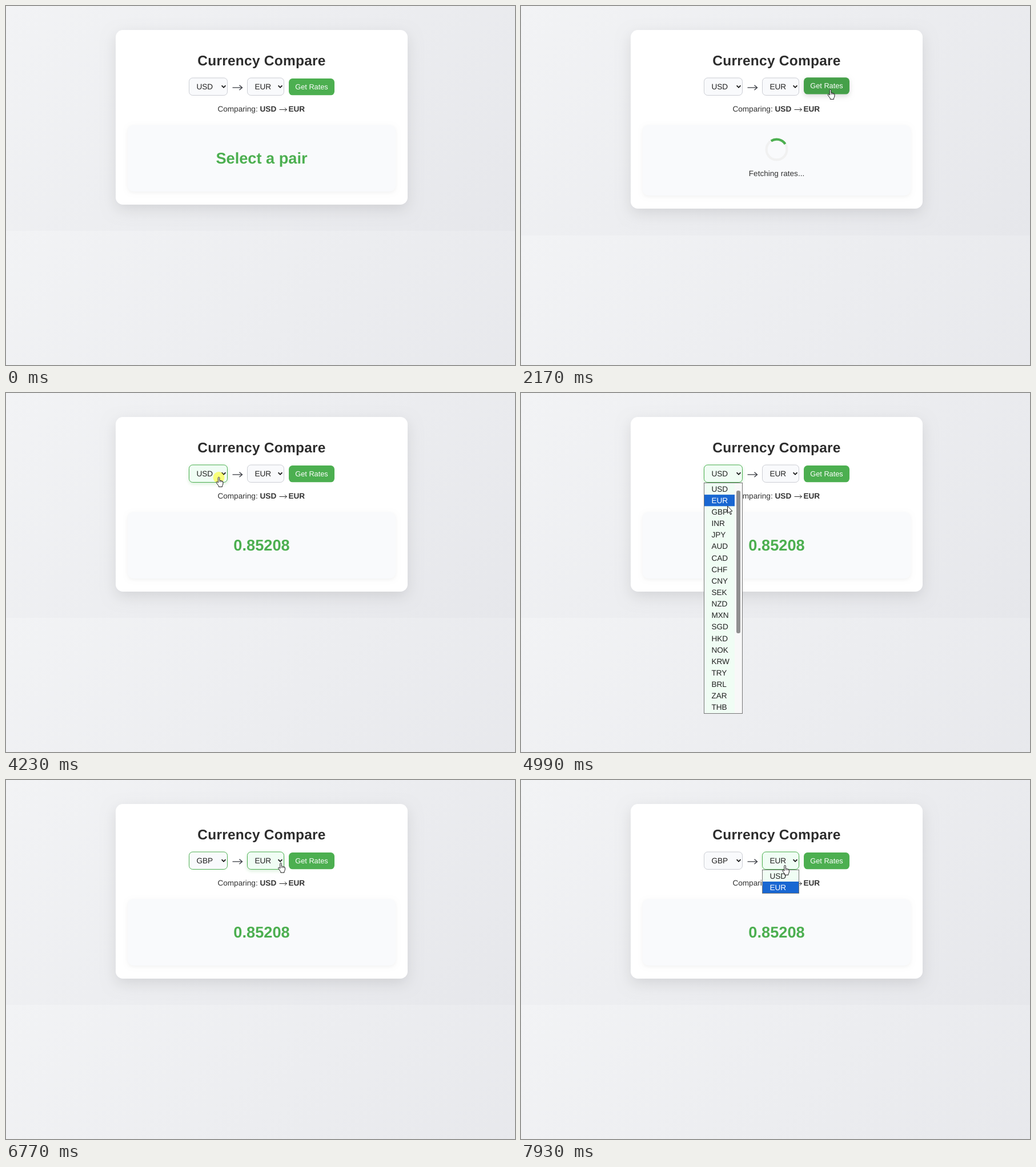
An HTML page with a canvas that plays this animation: 891x629 px, repeating every 8 s.

```html
<!DOCTYPE html>
<html lang="en">
<head>
<meta charset="utf-8">
<title>Currency Compare</title>
<style>
html, body { margin: 0; width: 100%; height: 100%; overflow: hidden; background: #ebecf0; }
canvas { display: block; }
</style>
</head>
<body>
<canvas id="stage" width="891" height="629"></canvas>
<script>
const W = 891, H = 629, LOOP = 8000;
const ctx = document.getElementById('stage').getContext('2d');
const FONT = '"Liberation Sans", Arial, sans-serif';
const GREEN = '#4caf50', INK = '#333';
const CODES = ('USD EUR GBP INR JPY AUD CAD CHF CNY SEK ' +
  'NZD MXN SGD HKD NOK KRW TRY BRL ZAR THB').split(' ');

// Cursor hot spot: time, x, y
const PATH = [
  [280, 855, 452], [1000, 543, 149], [1100, 545, 145], [1570, 545, 145],
  [1640, 541.5, 146], [2430, 541.5, 146], [2870, 521, 212], [3349, 521, 212],
  [3350, 518, 212], [3550, 518, 212], [4230, 372.5, 147], [4330, 372.5, 147],
  [5130, 360, 202], [5199, 360, 202], [5200, 360, 201], [5490, 360, 201],
  [5880, 455, 192], [6200, 455, 192], [6520, 462, 146], [6620, 462, 146],
  [6980, 512, 143], [7120, 510, 143], [7330, 460, 140], [7700, 462, 149]
];
const LOAD = [2137, 2520];
const CLICKS = [[2100, 2165], [4230, 4370], [5460, 5525], [7720, 7860]];
const LIST_A = [4300, 5525], LIST_B = [7790, 8000];

const within = (t, [a, b]) => t >= a && t < b;
const clamp = v => Math.max(0, Math.min(1, v));
const smooth = v => { v = clamp(v); return v * v * (3 - 2 * v); };
const fade = (t, on, off, dur = 250) => smooth((t - on) / dur) - smooth((t - off) / dur);
const mix = (a, b, k) => `rgb(${a.map((v, i) => Math.round(v + (b[i] - v) * k))})`;

function cursorAt(t) {
  const i = PATH.findIndex(p => p[0] > t);
  if (i < 0) return PATH[PATH.length - 1].slice(1);
  const [t0, x0, y0] = PATH[i - 1], [t1, x1, y1] = PATH[i];
  const k = smooth((t - t0) / (t1 - t0));
  return [x0 + (x1 - x0) * k, y0 + (y1 - y0) * k];
}

function box(x, y, w, h, r, fill, shadow) {
  ctx.save();
  if (shadow) [ctx.shadowOffsetY, ctx.shadowBlur, ctx.shadowColor] = shadow;
  ctx.fillStyle = fill;
  ctx.beginPath();
  ctx.roundRect(x, y, w, h, r);
  ctx.fill();
  ctx.restore();
}

function text(str, x, y, size, color, { bold = false, align = 'left', spacing = 0 } = {}) {
  ctx.font = `${bold ? 'bold ' : ''}${size}px ${FONT}`;
  ctx.textRendering = 'geometricPrecision';
  ctx.letterSpacing = spacing + 'px';
  ctx.textAlign = align;
  ctx.fillStyle = color;
  ctx.fillText(str, x, y);
}

function line(points, color, width) {
  ctx.strokeStyle = color;
  ctx.lineWidth = width;
  ctx.beginPath();
  points.forEach(([x, y]) => ctx.lineTo(x, y));
  ctx.stroke();
}

function arrow(x0, x1, y, head, color, width) {
  line([[x0, y], [x1, y]], color, width);
  line([[x1 - head, y - head * 0.85], [x1, y], [x1 - head, y + head * 0.85]], color, width);
}

function background(h) {
  const q = (W + h) / 4;
  for (let y = 0; y < H; y += h) {
    const g = ctx.createLinearGradient(W / 2 - q, y + h / 2 - q, W / 2 + q, y + h / 2 + q);
    g.addColorStop(0, '#f2f3f5');
    g.addColorStop(1, '#e6e7eb');
    ctx.fillStyle = g;
    ctx.fillRect(0, y, W, h);
  }
}

const selectFill = k => mix([249, 250, 252], [240, 253, 244], k);

function select(x, w, label, hover, focus) {
  const fill = selectFill(hover);
  box(x, 125.5, w, 31.5, 6.8, fill, [2, 6, `rgba(76,175,80,${0.25 * hover})`]);
  ctx.strokeStyle = mix([204, 206, 212], [76, 175, 80], Math.max(hover, focus));
  ctx.lineWidth = 1;
  ctx.beginPath();
  ctx.roundRect(x + 0.5, 126, w - 1, 30.5, 6.3);
  ctx.stroke();
  text(label, x + 13.4, 146, 13.6, '#222');
  const c = x + w - 7;
  line([[c - 3.4, 139.4], [c, 142.9], [c + 3.4, 139.4]], '#111', 1.7);
}

function list(x, w, codes, active, bottom, fill, scroll) {
  const top = 157, row = (bottom - top - 2) / codes.length, bar = scroll ? 13 : 0;
  ctx.fillStyle = fill;
  ctx.fillRect(x, top, w, bottom - top);
  codes.forEach((code, i) => {
    const y = top + 1 + i * row;
    if (i === active) {
      ctx.fillStyle = '#1967d2';
      ctx.fillRect(x + 1, y, w - 2 - bar, row);
    }
    text(code, x + 13.4, y + 14.6, 13.6, i === active ? '#fff' : '#222');
  });
  if (scroll) {
    ctx.fillStyle = '#f8f8f8';
    ctx.fillRect(x + w - 1 - bar, top + 1, bar, bottom - top - 2);
    box(x + w - bar + 2, top + 14, bar - 6, 250, 3, '#909090');
  }
  ctx.strokeStyle = '#767676';
  ctx.lineWidth = 1;
  ctx.strokeRect(x + 0.5, top + 0.5, w - 1, bottom - top - 1);
}

function button(hover) {
  const y = 127 - 1.7 * hover;
  box(495, y, 80, 29.3, 6.5, mix([76, 175, 80], [69, 160, 73], hover),
    [3.4, 8.5, `rgba(0,0,0,${0.14 * hover})`]);
  text('Get Rates', 535, y + 18.7, 12.75, '#fff', { align: 'center' });
}

function spinner(t) {
  const start = (t - LOAD[0]) / 1000 * Math.PI * 2 - Math.PI * 0.75;
  const ring = (from, sweep, color) => {
    ctx.strokeStyle = color;
    ctx.lineWidth = 4.25;
    ctx.beginPath();
    ctx.arc(447.5, 251.5, 17.9, from, from + sweep);
    ctx.stroke();
  };
  ring(0, Math.PI * 2, '#f1f1f1');
  ring(start, Math.PI / 2, GREEN);
  text('Fetching rates...', 447.5, 298, 13.6, INK, { align: 'center' });
}

const POINTER = new Path2D('M.5 .5V13.2L3.4 10.5L5.6 15.3L7.4 14.5L5.3 9.8L9 9.4Z');
const HAND = new Path2D('M-1.2 10.2V1.6Q-1.1.4 0 .4T1.3 1.6V6.3Q2.6 5.6 3.5 6.9Q4.9 6.2 5.6 7.5' +
  'Q7.2 7.1 7.4 8.8V12Q7.2 14 6 15.4V17.4H-.2V15.8L-3.7 11Q-5 8.8-3.8 8.4Q-2.9 8-1.2 10.2Z');

function cursor(t) {
  const [x, y] = cursorAt(t);
  if (CLICKS.some(c => within(t, c))) {
    ctx.fillStyle = 'rgba(255,255,0,.5)';
    ctx.beginPath();
    ctx.arc(x, y + 1, 10, 0, Math.PI * 2);
    ctx.fill();
  }
  const overControl = y > 125 && y < 157 &&
    [[320, 388], [422, 487], [495, 575]].some(s => within(x, s));
  const shape = overControl ? HAND : POINTER;
  ctx.save();
  ctx.translate(x, y);
  ctx.lineJoin = 'round';
  ctx.lineWidth = 1;
  ctx.fillStyle = '#fff';
  ctx.strokeStyle = '#1c1c1c';
  ctx.fill(shape);
  ctx.stroke(shape);
  if (overControl) [1.3, 3.4, 5.5].forEach(k => line([[k, 6.8], [k, 9.3]], '#1c1c1c', 0.8));
  ctx.restore();
}

function draw(t) {
  const loading = within(t, LOAD), grow = loading ? 7 : 0;
  const hoverA = fade(t, 4020, 5525, 200);
  const hoverB = fade(t, 6440, 6780) + fade(t, 7225, 9000);
  const hoverBtn = fade(t, 920, 2550) + fade(t, 6760, 7205);

  background(394 + grow + (loading ? 1 : 0));
  box(192, 42, 511, 306 + grow, 12.5, '#fff', [8.5, 25, 'rgba(0,0,0,.1)']);
  text('Currency Compare', 447.5, 104, 24.48, '#2d2d2d', { bold: true, align: 'center', spacing: 0.25 });

  select(320, 68, t < 5525 ? 'USD' : 'GBP', hoverA, fade(t, 4180, 7700, 200));
  arrow(396.5, 413.5, 143, 5, '#2c2f36', 1.2);
  select(422, 65, 'EUR', hoverB, fade(t, 7700, 9000, 150));
  button(hoverBtn);

  text('Comparing:', 370.4, 185.3, 13.6, INK);
  text('USD', 444.5, 185.3, 13.6, INK, { bold: true });
  arrow(478.5, 491.5, 181.5, 3.6, INK, 1);
  text('EUR', 494.4, 185.3, 13.6, INK, { bold: true });

  box(213, 208.5, 469, 116.5 + grow, 10, '#f9fafc', [2, 7, 'rgba(0,0,0,.05)']);
  if (loading) spinner(t);
  else text(t < LOAD[0] ? 'Select a pair' : '0.85208', 447.5, 276, 27.2, GREEN, { bold: true, align: 'center' });

  if (within(t, LIST_A)) {
    const active = Math.max(0, Math.min(2, Math.floor((cursorAt(t)[1] - 158) / 20.15)));
    list(320, 68, CODES, active, 562, selectFill(hoverA), true);
  }
  if (within(t, LIST_B)) list(422, 65, ['USD', 'EUR'], 1, 199, selectFill(hoverB), false);
  if (t >= PATH[0][0]) cursor(t);
}

function tick() {
  draw(performance.now() % LOOP);
  requestAnimationFrame(tick);
}
tick();
</script>
</body>
</html>
```
